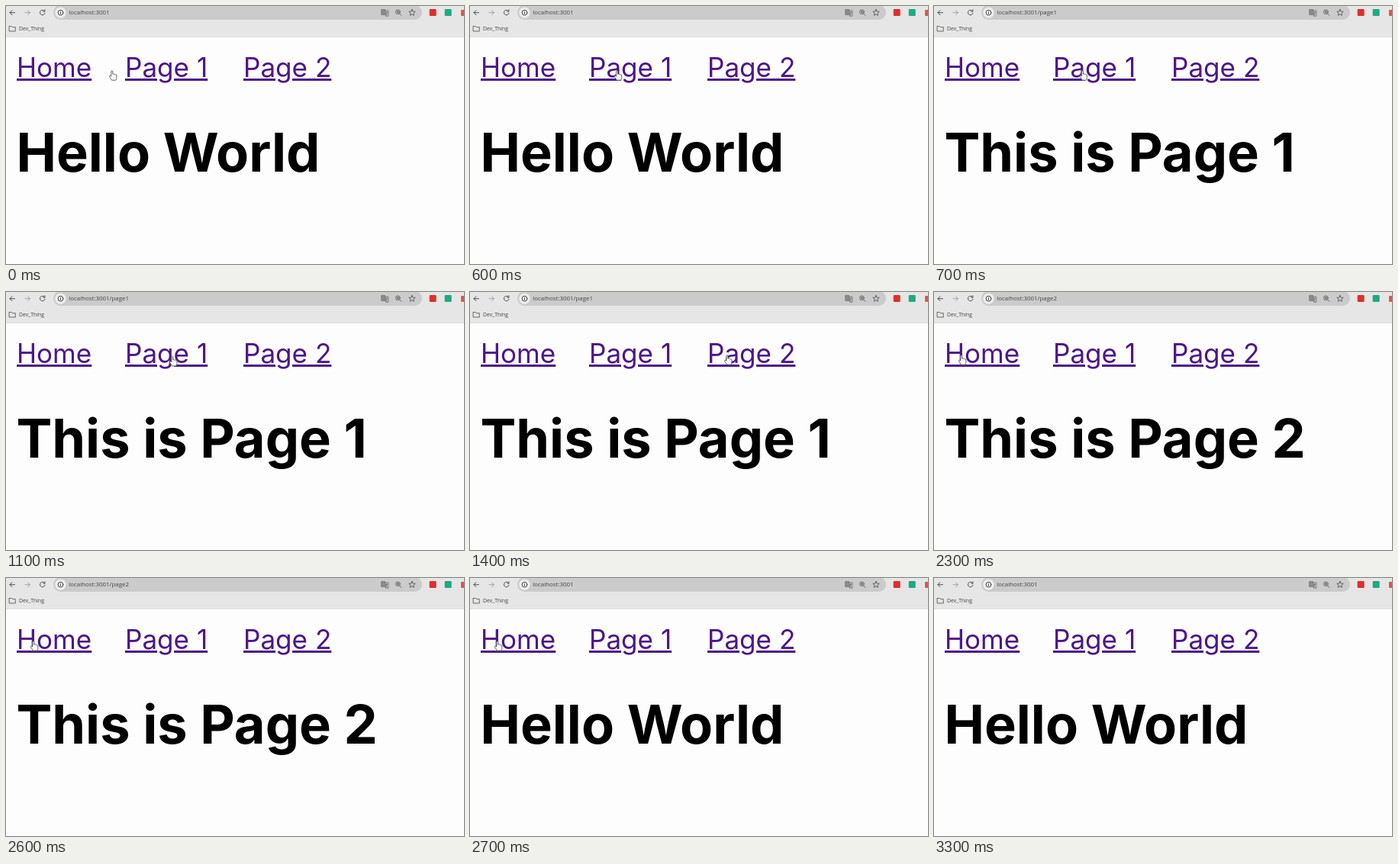
An HTML page that plays this animation: 600 px wide and 338 px high, repeating every 3.4 s.

```html
<!DOCTYPE html>
<html lang="en">
<head>
<meta charset="utf-8">
<title>Page navigation</title>
<style>
  html, body { margin: 0; width: 100%; height: 100%; overflow: hidden; background: #fdfdfd; }
  svg { position: absolute; left: 0; top: 0; width: 600px; height: 338px; }
  .ui { font-family: "Open Sans", sans-serif; fill: #444; }
  .link {
    position: absolute; top: 59px; white-space: nowrap;
    font: 400 35.1px Inter, sans-serif; color: #4d1788;
    text-decoration: underline 2.8px; text-underline-offset: 2px;
  }
  #title { font: 700 70.3px Inter, sans-serif; fill: #000; }
  .icon { fill: none; stroke: #4a4a4a; stroke-linecap: round; stroke-linejoin: round; }
</style>
</head>
<body>
<svg viewBox="0 0 600 338">
  <rect width="600" height="40" fill="#e6e6e6"/>
  <rect y="40" width="600" height="1" fill="#dcdcdc"/>
  <rect x="62" y="-1" width="483" height="19" rx="9.5" fill="#cbcbcb"/>
  <circle cx="71.5" cy="8.7" r="7.2" fill="#ececec"/>

  <g class="icon">
    <path d="M11.5 8.7H5M8 5.7l-3 3 3 3"/>
    <path d="M25 8.7h6.5M28.5 5.7l3 3-3 3" stroke="#a2a2a2"/>
    <path d="M50.6 6.7a3.3 3.3 0 1 0 .5 2.5M51 4.8v2.3h-2.3"/>
    <circle cx="71.5" cy="8.7" r="3.4"/>
    <path d="M71.5 8.5v1.8M71.5 6.9v.1"/>
    <g stroke-width=".8">
      <path d="M492 4.5h4.5l1.6 7H492z" fill="#8a8a8a" stroke="#777"/>
      <path d="M497 6h3.8v7.2h-3.6l.9-1.7M498.2 8.3h1.8M499 8.3l-.5 2" stroke="#666"/>
      <circle cx="513.4" cy="7.8" r="2.8"/>
      <path d="M515.6 10l2.3 2.4M512.2 7.8h2.4M513.4 6.6v2.4"/>
      <path d="M532 4.4l1.2 2.7 3 .3-2.3 2 .7 2.9-2.6-1.5-2.6 1.5.7-2.9-2.3-2 3-.3z"/>
      <path d="M4.5 26.5h2.8l1 1.2h4v5.3H4.5z"/>
    </g>
  </g>

  <rect x="554.7" y="4" width="9" height="9" rx="1" fill="#d8322f"/>
  <rect x="574.7" y="4" width="9" height="9" rx="1" fill="#20a982"/>
  <rect x="596" y="5" width="8" height="8" rx="1" fill="#e5514b"/>

  <text class="ui" id="url" x="82.3" y="11.4" font-size="7.9"></text>
  <text class="ui" x="17" y="32.2" font-size="6.9">Dev_Thing</text>
  <text id="title" x="13.4" y="216.7"></text>
</svg>

<span class="link" style="left:14px">Home</span>
<span class="link" style="left:156px">Page 1</span>
<span class="link" style="left:311px">Page 2</span>

<svg viewBox="0 0 600 338">
  <path id="hand" fill="#fff" stroke="#555" stroke-width=".9" stroke-linejoin="round"
    d="M-2.2 1.2V-5.2q.1-1 1-1t1 1V-1.8q1.4-.7 1.8.3 1.3-.5 1.7.4 1.5-.3 1.6 1V2.6Q4.9 4.4 3.8 6.2H-1.5Q-2.5 4.2-4.4 1.8-5 .6-4 .2-3 .1-2.2 1.2z"/>
</svg>
<script>
const LOOP = 3400, STEP = 100;
const $ = id => document.getElementById(id);

// [start time, path, heading]
const pages = [
  [0, "", "Hello World"],
  [700, "/page1", "This is Page 1"],
  [1600, "/page2", "This is Page 2"],
  [2700, "", "Hello World"]
];

// [time, x, y] of the pointer
const track = [
  [0, 140, 91], [500, 192, 91], [700, 195.5, 91], [1000, 197, 91],
  [1400, 338, 89], [1800, 339, 89], [2200, 37, 89], [3000, 37, 89],
  [3200, 32, 95]
];
const HIDE = 3300;

function pointerAt(t) {
  const i = track.findIndex(p => p[0] > t);
  if (i < 0) return track.at(-1).slice(1);
  const [t0, x0, y0] = track[i - 1], [t1, x1, y1] = track[i];
  const u = (t - t0) / (t1 - t0), e = u * u * (3 - 2 * u);
  return [x0 + (x1 - x0) * e, y0 + (y1 - y0) * e];
}

function draw(now) {
  const t = Math.floor(now % LOOP / STEP) * STEP;
  const [, path, heading] = pages.findLast(p => p[0] <= t);
  $("url").textContent = "localhost:3001" + path;
  $("title").textContent = heading;
  $("hand").setAttribute("transform", `translate(${pointerAt(t)})`);
  $("hand").setAttribute("visibility", t < HIDE ? "visible" : "hidden");
}

const start = performance.now();
function tick() {
  draw(performance.now() - start);
  requestAnimationFrame(tick);
}
tick();
</script>
</body>
</html>
```
